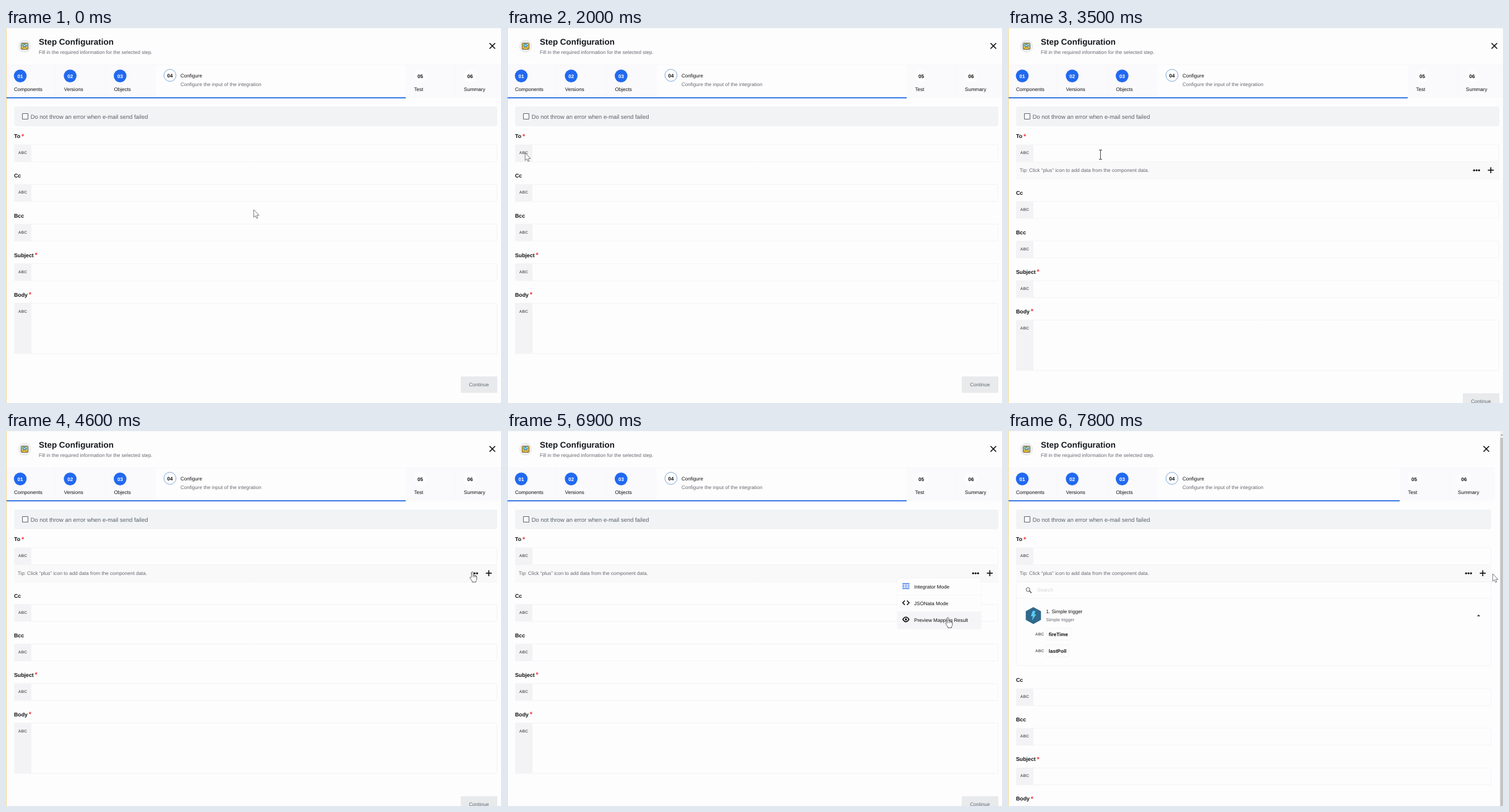
These frames come from a looping animation (800x607 px, 8000 ms). An HTML page with a canvas:

```html
<!DOCTYPE html>
<html lang="en">
<head>
<meta charset="utf-8">
<title>Step Configuration</title>
<style>
html, body { margin: 0; width: 100%; height: 100%; overflow: hidden; background: #fefdfe; }
canvas { display: block; }
</style>
</head>
<body>
<canvas id="stage" width="800" height="607"></canvas>
<script>
const ctx = document.getElementById('stage').getContext('2d');
const LOOP = 8000, STEP = 100;
const OPEN = 3000, MENU = 5100, CLOSE = 7500, PANEL = 7600;
const INK = '#111', GREY = '#666a70', BLUE = '#2169f0', EDGE = '#f3f2f5', PAGE = '#fefdfe';

// Pointer stops: time, x, y
const PATH = [
  [200, 400, 294], [300, 390, 291], [400, 350, 283], [600, 212, 252], [800, 92, 224],
  [900, 64, 216], [1100, 38, 207], [1200, 29, 203], [1900, 29, 203], [2200, 29, 200],
  [2600, 29, 200], [2700, 35, 201], [2800, 47, 203], [2900, 50, 203], [3300, 50, 203],
  [3400, 68, 203], [3600, 230, 207], [3800, 500, 216], [4000, 690, 226], [4200, 754, 229],
  [5500, 754, 229], [5700, 738, 237], [6000, 705, 253], [6300, 710, 266],
  [6400, 712, 281], [6600, 714, 309], [6800, 714, 309], [6900, 713, 303], [7000, 721, 288],
  [7100, 749, 255], [7200, 779, 220], [7300, 783, 231]
];

function pointerAt(t) {
  const i = PATH.findIndex(p => p[0] > t);
  if (i === 0) return PATH[0].slice(1);
  if (i < 0) return PATH[PATH.length - 1].slice(1);
  const [t0, x0, y0] = PATH[i - 1], [t1, x1, y1] = PATH[i];
  const k = (t - t0) / (t1 - t0);
  return [Math.round(x0 + (x1 - x0) * k), Math.round(y0 + (y1 - y0) * k)];
}

function paint(path, fill, stroke, width = 1) {
  if (fill) { ctx.fillStyle = fill; ctx.fill(path); }
  if (stroke) { ctx.strokeStyle = stroke; ctx.lineWidth = width; ctx.stroke(path); }
}

function box(x, y, w, h, fill, stroke, r = 0) {
  const p = new Path2D();
  p.roundRect(x, y, w, h, r);
  paint(p, fill, stroke);
}

function disc(x, y, r, fill, stroke) {
  const p = new Path2D();
  p.arc(x, y, r, 0, 7);
  paint(p, fill, stroke);
}

function line(pts, color, width = 1) {
  const p = new Path2D();
  for (let i = 0; i < pts.length; i += 2) p.lineTo(pts[i], pts[i + 1]);
  paint(p, null, color, width);
}

function shape(d, x, y, fill, stroke, width = 1) {
  ctx.save();
  ctx.translate(x, y);
  paint(new Path2D(d), fill, stroke, width);
  ctx.restore();
}

// y is the middle of the capitals
function text(s, x, y, size = 8.08, color = INK, bold = false, align = 'left') {
  ctx.font = `${bold ? 'bold ' : ''}${size}px "Liberation Sans", Arial, sans-serif`;
  ctx.textRendering = 'geometricPrecision';
  ctx.fillStyle = color;
  ctx.textAlign = align;
  ctx.fillText(s, x, y + size * 0.36);
}

const abc = (x, y) => text('ABC', x, y, 6.5, '#66666a', true);

function header(right) {
  box(16.5, 13.5, 27, 32, null, '#fbfafc', 2);
  disc(30, 29.5, 10.5, '#ececee');
  box(24.5, 24.5, 11, 10, '#f0c542', '#6b6138', 1);
  box(26.5, 25.5, 7, 5, '#3f9bd0');
  line([28, 27, 30, 29, 33, 26], '#eef6fa', 1);
  line([25, 34, 30, 30.5, 35, 34], '#6b6138', 0.7);
  text('Step Configuration', 53, 22.2, 13.44, '#15191e', true);
  text('Fill in the required information for the selected step.', 53, 39.4, 8.08, GREY);
  const x = right - 8;
  line([x - 4.5, 24.5, x + 4.5, 33.5], INK, 1.6);
  line([x + 4.5, 24.5, x - 4.5, 33.5], INK, 1.6);
}

function step(n, name, x, done) {
  disc(x + 10, 77.6, 10.3, done ? BLUE : PAGE);
  text('0' + n, x + 10, 77.7, 8.08, done ? '#fff' : INK, true, 'center');
  text(name, x, 99.4);
}

function stepper(right) {
  const tail = right - 148;
  box(1, 59, right + 5, 54, '#faf9fb');
  box(242, 59, tail - 242, 54, PAGE);
  for (const x of [79.5, 160.5, tail + 80.5]) line([x, 60, x, 112], '#f6f5f8');
  line([1, 59.5, right + 6, 59.5], '#f7f6f9');
  ['Components', 'Versions', 'Objects'].forEach((s, i) => step(i + 1, s, 13 + i * 80.7, true));
  disc(265, 76.6, 9.8, PAGE, '#80a9d8');
  text('04', 265, 76.7, 8.08, INK, true, 'center');
  text('Configure', 282, 76.7);
  text('Configure the input of the integration', 282, 91.3, 8.08, GREY);
  step(5, 'Test', tail + 13.5, false);
  step(6, 'Summary', tail + 94, false);
  box(1, 112, tail - 1, 2, '#3c7be6');
}

function field(name, y, right, needed, height = 27.5) {
  text(name, 13, y, 8.8, INK, true);
  if (needed) text('*', 14.8 + ctx.measureText(name).width, y - 0.4, 11, '#f03a36', true);
  box(13.5, y + 14, right - 14, height, PAGE, EDGE, 2);
  box(13, y + 14, 28, height, '#f3f2f4');
  abc(19.8, y + 26.8);
}

function form(shift, right) {
  box(13, 127, right - 13, 32, '#f1f3f5', null, 4);
  box(26.5, 138.5, 9, 9, '#fafbfc', '#62676c');
  text('Do not throw an error when e-mail send failed', 39.7, 144, 9.4, '#5b636b');
  field('To', 175, right, true);
  field('Cc', 239.3 + shift, right);
  field('Bcc', 303.4 + shift, right);
  field('Subject', 367.5 + shift, right, true);
  field('Body', 431.5 + shift, right, true, 81.5);
  box(right - 59, 564 + shift, 59, 26.5, '#e8eaec', null, 1);
  text('Continue', right - 29.7, 577 + shift, 8.08, '#626b74', false, 'center');
}

function tipBar(right) {
  box(13, 217, right - 13, 27, '#faf9fa');
  line([13, 244, right, 244], EDGE);
  text('Tip: Click “plus” icon to add data from the component data.', 18.7, 230, 8.08, GREY);
  for (let i = -1; i < 2; i++) disc(right - 36.7 + i * 4, 230.3, 1.6, INK);
  const x = right - 13.7;
  line([x - 4.8, 230.2, x + 4.8, 230.2], INK, 1.6);
  line([x, 225.4, x, 235], INK, 1.6);
}

function menu(x, y) {
  ctx.save();
  ctx.shadowColor = 'rgba(40,40,60,.06)';
  ctx.shadowBlur = 3;
  box(631, 238.5, 135, 81.5, PAGE, null, 2);
  ctx.restore();
  if (inMenu(x, y)) box(631, 238.5 + 27.2 * Math.min(2, Math.floor((y - 238) / 27.2)), 135, 27.2, '#f5f4f6');
  line([631, 265.7, 766, 265.7], '#f5f4f6');
  line([631, 292.8, 766, 292.8], '#f5f4f6');
  for (const yy of [247, 255]) line([639, yy, 650.5, yy], BLUE, 1.3);
  for (const yy of [249.7, 252.3])
    for (let i = 0; i < 3; i++) line([639 + i * 4.2, yy, 642 + i * 4.2, yy], BLUE, 1.2);
  line([643, 274.5, 639.6, 278, 643, 281.5], INK, 1.5);
  line([646.5, 274.5, 649.9, 278, 646.5, 281.5], INK, 1.5);
  shape('M-5 0Q0-7.6 5 0Q0 7.6-5 0Z', 644.7, 305, PAGE, INK, 1.5);
  disc(644.7, 305, 1.8, INK);
  ['Integrator Mode', 'JSONata Mode', 'Preview Mapping Result'].forEach((s, i) => text(s, 658, 252 + i * 27.2));
}

function chip(name, y, w) {
  abc(44, y - 0.5);
  box(61.5, y - 9.5, w, 19, PAGE, '#f5f4f6', 2);
  text(name, 65.7, y, 8.08, INK, true);
}

function panel(right) {
  box(13.5, 244.5, right - 14, 135.5, PAGE, EDGE);
  disc(32.3, 256.6, 3, null, '#55585c');
  line([34.6, 258.9, 38, 262.2], '#55585c', 1.6);
  text('Search', 47.3, 257.4, 8.08, '#d2d3d6');
  line([13, 271, right, 271], EDGE);
  const hex = ctx.createLinearGradient(29, 286, 53, 312);
  hex.addColorStop(0, '#2f698c');
  hex.addColorStop(1, '#204c70');
  shape('M0-13.8L12.3-7V7L0 13.8L-12.3 7V-7Z', 41, 298.8, hex);
  shape('M-1.2-7.5H3.6L1.4-2H4.6L-2.2 8L-.8 1H-4Z', 41, 298.8, '#5ccaf6');
  text('1. Simple trigger', 61.5, 291.8);
  text('Simple trigger', 61.5, 305, 7.4, GREY);
  shape('M-2.7 1.4L0-1.5L2.7 1.4Z', right - 20.4, 298.5, '#444');
  chip('fireTime', 329, 40);
  chip('lastPoll', 356, 37);
}

function scrollbar() {
  box(795, 0, 5, 607, '#f1f0f2');
  box(795.5, 11, 4.5, 596, '#c3c3c5');
  shape('M-1.5 1.2L.5-1L2.5 1.2Z', 797.5, 6, '#8a8a8e');
}

const inMenu = (x, y) => x > 631 && x < 766 && y >= 238 && y < 320;

function pointer(x, y, hand, beam) {
  ctx.lineJoin = 'round';
  if (hand) {
    shape('M-1.3 8V.8Q-1.3-.6 0-.6Q1.3-.6 1.3.8V5Q3.4 3.6 3.7 5.6Q5.4 4.6 5.6 6.4Q7 5.7 7.1 7.5V11Q7 13.2 5.8 14.2V16H-.3V14.4L-4 9.3Q-4 7.4-2.4 8L-1.3 9.2', x - 0.3, y - 0.5, '#fff', '#55565a', 0.9);
    for (let i = 0; i < 3; i++) line([x + 1 + i * 2.1, y + 4.5, x + 1 + i * 2.1, y + 7.9], '#55565a', 0.8);
  } else if (beam) {
    shape('M-2.5-7.5H2.5M0-7.5V7.5M-2.5 7.5H2.5', x + 0.5, y, null, '#44464a');
  } else {
    shape('M0 0V12.4L2.8 9.9L4.7 14.2L6.6 13.4L4.8 9.2H8.7Z', x + 0.3, y, '#fff', '#6a6b70', 0.9);
  }
  ctx.lineJoin = 'miter';
}

function draw(t) {
  const wide = t >= PANEL, open = t >= OPEN;
  const right = wide ? 781 : 794;
  const shift = wide ? 163.7 : open ? 27.3 : 0;
  const hasMenu = t >= MENU && t < CLOSE;
  const [x, y] = pointerAt(t);
  box(0, 0, 800, 607, PAGE);
  line([0, 0.5, 800, 0.5], '#f7f6f8');
  header(right);
  stepper(right);
  form(shift, right);
  if (open) tipBar(right);
  if (wide) { panel(right); scrollbar(); }
  if (hasMenu) menu(x, y);
  // Text caret blinks while the field has focus
  if ((t >= OPEN && t < 3500) || (t >= 4100 && t < 4600)) box(45.5, 198, 1, 10, '#333');
  box(0, 0, 1, 607, '#f4d48c');
  const onBar = open && x > right - 48 && x < right - 6 && y > 222 && y < 239;
  pointer(x, y, onBar || (hasMenu && inMenu(x, y)), x > 41 && x < right && y > 189 && y < 215);
}

const start = performance.now();
function tick() {
  const t = (performance.now() - start) % LOOP;
  draw(Math.floor(t / STEP) * STEP);
  requestAnimationFrame(tick);
}
tick();
</script>
</body>
</html>
```
